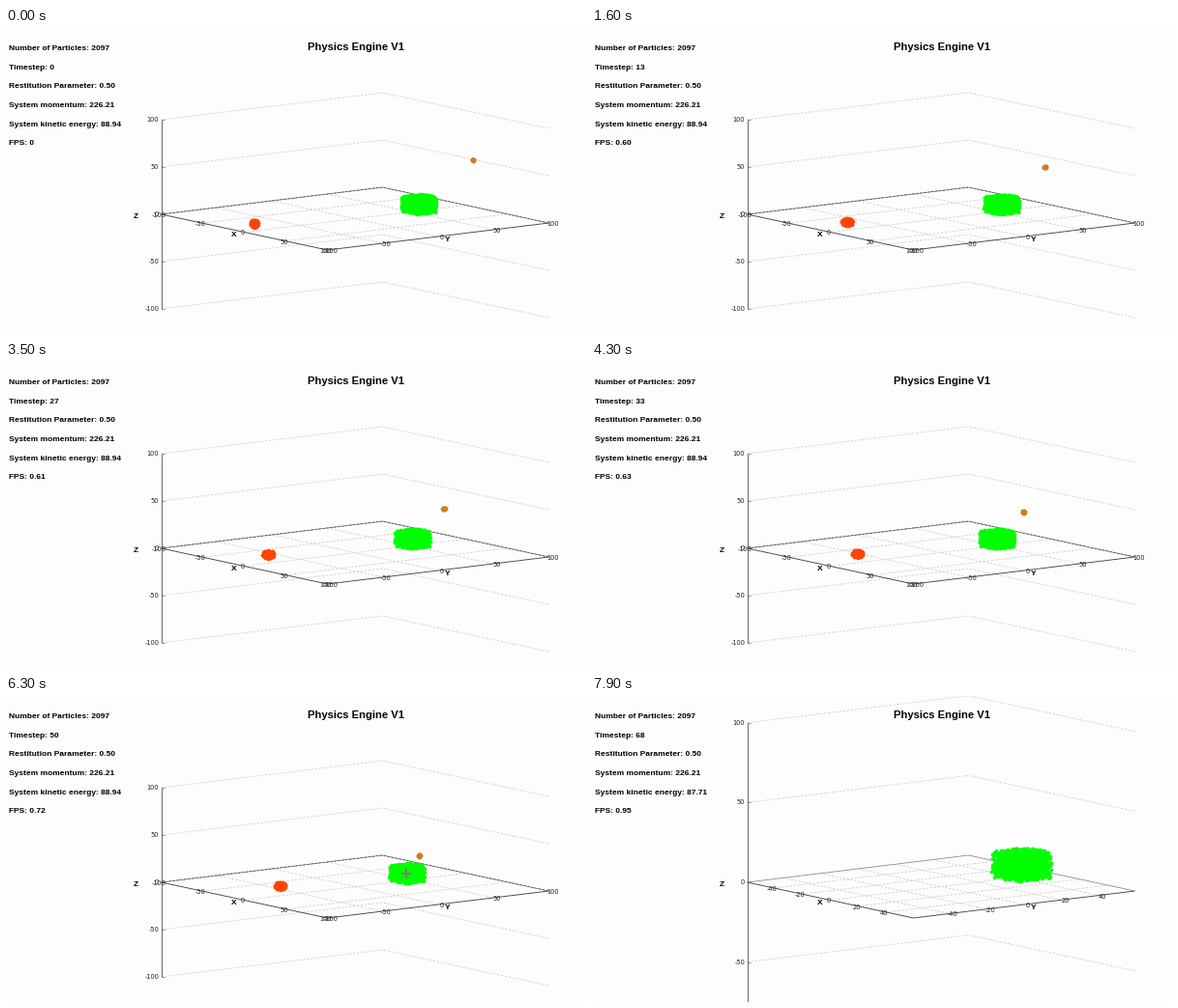
These frames come from a looping animation (600x317 px, 8 s). A matplotlib script:

```python
import numpy as np
import matplotlib
import matplotlib.pyplot as plt
from matplotlib.animation import FuncAnimation

matplotlib.rcParams["text.hinting"] = "force_autohint"

W, H, DPI = 600, 317, 100
FRAMES, INTERVAL = 80, 100
PT = 72 / DPI
CENTER = np.array([361.0, 197.5])
ZOOM = 1 / 0.77
SCALES = (1.0, ZOOM, ZOOM ** 2)
ZOOM_FRAMES = (65, 67)

rng = np.random.default_rng(7)
fig = plt.figure(figsize=(W / DPI, H / DPI), dpi=DPI, facecolor="#fefdfe")
ax = fig.add_axes([0, 0, 1, 1])
ax.set(xlim=(0, W), ylim=(H, 0))
ax.axis("off")


def offset(x, y, z):
    """Oblique view of a 3D vector, in pixels at scale 1."""
    return np.stack([0.86 * x + 1.145 * y,
                     0.185 * x - 0.14 * y - 0.98 * z], axis=-1)


def project(x, y, z, scale):
    return CENTER + scale * offset(x, y, z)


def line(points, color, width, dashes=None, zorder=1):
    xs, ys = np.array(points).T
    art, = ax.plot(xs, ys, color=color, lw=width * PT, zorder=zorder,
                   solid_capstyle="butt")
    if dashes:
        art.set_dashes(dashes)
    return art


def label(x, y, text, size, ha="center", bold=False, family="DejaVu Sans",
          color="black"):
    """Text whose capitals are centred on y."""
    return ax.text(x, y + 0.3 * size, text, fontsize=size * PT, ha=ha,
                   va="baseline", family=family, color=color, zorder=9,
                   weight="bold" if bold else "normal")


def heading(x, y, text, size=8.35, ha="left"):
    return label(x, y, text, size, ha, True, "Liberation Sans")


def tick_label(x, y, value, ha="center"):
    return label(x, y, str(value), 6.6, ha, color="#222222")


def build_axes(scale):
    arts = []
    lim = 100 / scale
    step = 50 if scale < 1.5 else 20
    ticks = [v for v in range(-100, 101, step) if abs(v) <= lim]

    def seg(*points, color="#cccccc", width=0.8, dashes=(3, 2)):
        path = [project(*p, scale) for p in points]
        arts.append(line(path, color, width, dashes))

    for v in ticks:
        if abs(v) < lim:
            seg((v, -lim, 0), (v, lim, 0))
            seg((-lim, v, 0), (lim, v, 0))
        x, y = project(v, -lim, 0, scale)
        arts.append(tick_label(x - 2.2, y + 1, v))
        x, y = project(lim, v, 0, scale)
        arts.append(tick_label(x + 3.7, y + 1, v))

    for z in range(-100, 101, 50):
        if z:
            seg((-lim, -lim, z), (-lim, lim, z), (lim, lim, z))
        x, y = project(-lim, -lim, z, scale)
        if 0 < y < H:
            arts.append(line([(x, y), (x + 3, y)], "#777777", 0.8))
            arts.append(tick_label(x - 2.2, y, z, "right"))

    back = [(-lim, -lim, 0), (-lim, lim, 0), (lim, lim, 0)]
    seg(*back, color="#888888", width=0.8, dashes=None)
    if scale == 1:
        seg(*back, color="#555555")
    seg((-lim, -lim, 0), (lim, -lim, 0), (lim, lim, 0),
        color="#444444", width=0.9, dashes=None)
    seg((-lim, -lim, -100), (-lim, -lim, 100),
        color="#6a6a6a", width=1.0, dashes=None)
    return arts


def cloud(color, zorder):
    art, = ax.plot([], [], "o", ms=3.6 * PT, mew=0, color=color, zorder=zorder)
    return art


def disc(count):
    r = np.sqrt(np.linspace(0, 1, count))
    a = np.arange(count) * 2.4
    return np.column_stack([r * np.cos(a), r * np.sin(a)])


def show(art, points, scale):
    art.set_data(*(CENTER + scale * (points - CENTER)).T)


views = [build_axes(s) for s in SCALES]

# Jittered 14 x 14 x 10 block plus two round clusters: 2097 particles
side, tall = np.linspace(-8.7, 8.7, 14), np.linspace(-7.3, 7.3, 10)
lattice = np.stack(np.meshgrid(side, side, tall), -1).reshape(-1, 3)
lattice += rng.uniform(-0.95, 0.95, lattice.shape)
BLOCK = offset(*lattice.T)
BALL, PELLET = disc(110), disc(27)

pellet = cloud("#cd7f20", 4)
ball = cloud("#ff4500", 5)
block = cloud("#00ff00", 6)

cursor = [line([(409, 184), (419, 184)], "#8a7080", 1.8, zorder=8),
          line([(414, 179), (414, 189)], "#8a7080", 1.8, zorder=8)]

heading(361.6, 19.3, "Physics Engine V1", 11.2, "center")
heading(134.3, 194, "Z", ha="center")
heading(235.3, 213, "X", ha="center")
heading(456.8, 218, "Y", ha="center")
heading(2.8, 20.2, "Number of Particles: 2097")
step_text = heading(2.8, 40.2, "")
heading(2.8, 59.7, "Restitution Parameter: 0.50")
heading(2.8, 79.5, "System momentum: 226.21")
energy_text = heading(2.8, 99.5, "")
fps_text = heading(2.8, 118.7, "")


def update(frame):
    step = int(np.interp(frame, [0, 16, 35, 51, 63, 66, 73, 79],
                         [0, 13, 27, 40, 50, 53, 61, 68]) + 1e-6)
    fps = np.interp(step, [1, 13, 27, 40, 50, 53, 56, 61, 68],
                    [0.58, 0.60, 0.61, 0.66, 0.72, 0.76, 0.90, 0.97, 0.95])
    energy = np.interp(step, [64, 68], [88.94, 87.71])
    step_text.set_text(f"Timestep: {step}")
    energy_text.set_text(f"System kinetic energy: {energy:.2f}")
    fps_text.set_text(f"FPS: {fps:.2f}" if step else "FPS: 0")

    level = sum(frame >= f for f in ZOOM_FRAMES)
    scale = SCALES[level]
    for i, arts in enumerate(views):
        for art in arts:
            art.set_visible(i == level)

    # The round clusters loosen over the first few steps
    grow = 1 + 0.45 * min(step / 8, 1)
    show(block, BLOCK + [427 - 0.245 * step, 182.2 + 0.022 * step], scale)
    show(pellet, 1.15 * grow * PELLET
         + [483 - 1.11 * step, 136.6 + 0.572 * step], scale)
    show(ball, np.array([4.2 * grow, 4.2]) * BALL
         + [257 + 0.535 * step, 202.6 - 0.12 * step], scale)
    # The ball lies outside the plotted range at the closest zoom
    ball.set_visible(level < 2)
    for art in cursor:
        art.set_visible(62 <= frame <= 66)
    return []


anim = FuncAnimation(fig, update, frames=FRAMES, interval=INTERVAL,
                     init_func=lambda: [], repeat=True, repeat_delay=0)
plt.show()
```
